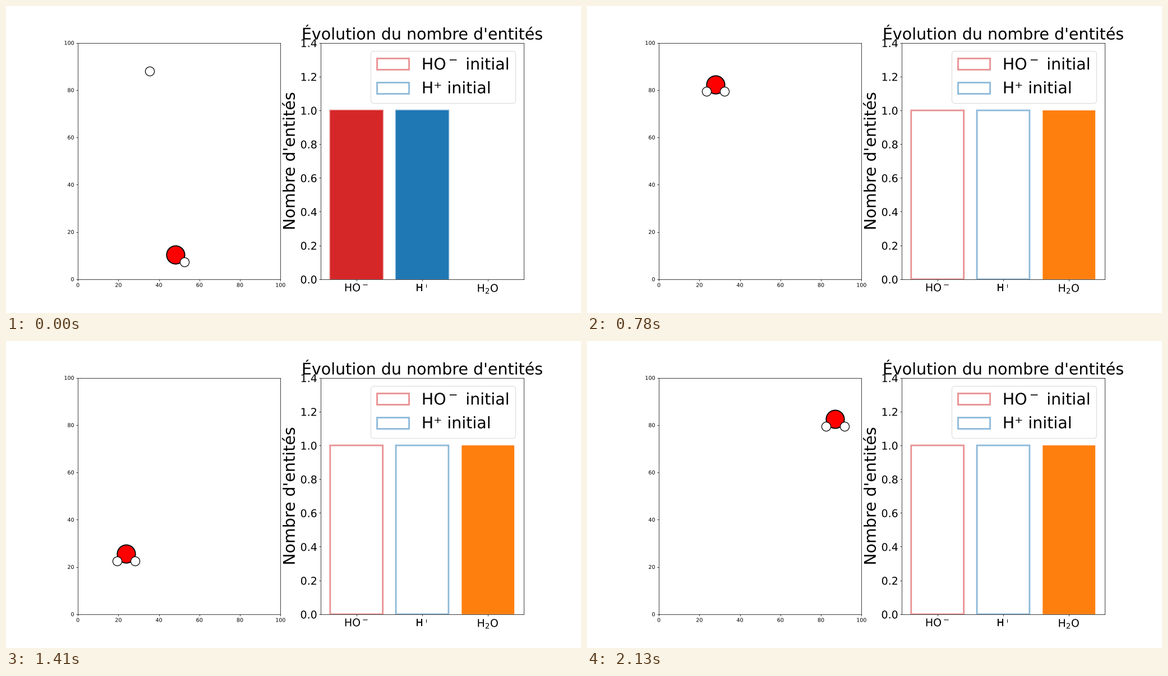
Write a matplotlib script that moves like this. It is 1025 by 547 pixels and loops after 2160 ms.

```python
import matplotlib.pyplot as plt
import numpy as np
from matplotlib.animation import FuncAnimation
from matplotlib.patheffects import Normal
from matplotlib.text import Text

plt.rcParams["font.family"] = "DejaVu Sans"

DPI = 547 / 8
FRAMES, CYCLE, REACTION = 72, 36, 11
RED, BLUE, ORANGE = "#d62728", "#1f77b4", "#ff7f0e"

# Walls the particles bounce between, in axis units (x, y)
LOW = np.array([6.35, 6.25])
HIGH = np.array([93.65, 93.70])
BOND_RIGHT = np.array([4.5, -3.0])
BOND_LEFT = np.array([-4.5, -3.0])

# (position, velocity per step)
HYDROXIDE = np.array([[48.15, 10.4], [10.48, 17.28]])
PROTON = np.array([[35.55, 88.1], [27.9, -8.93]])
WATER = np.array([[23.8, 25.6], [-11.365, 16.95]])


def bounce(particle, steps):
    """Uniform motion reflected elastically at the walls."""
    start, velocity = particle
    span = HIGH - LOW
    travel = start + velocity * steps - LOW
    return LOW + span - np.abs(travel % (2 * span) - span)


fig, (box, chart) = plt.subplots(
    1, 2, figsize=((1025 + 1e-6) / DPI, 8), dpi=DPI, facecolor="white"
)

box.set(xlim=(0, 100), ylim=(0, 100))


def atom(color, size, edge, z):
    (dot,) = box.plot([], [], "o", ms=size, mfc=color, mec="black", mew=edge,
                      zorder=z, snap=False)
    return dot


oxygen = atom("red", 34, 2, 3)
bound_h = atom("white", 17, 1.3, 4)
free_h = atom("white", 17, 1.3, 4)

minus = r"$^{\hspace{0.2}{-}\hspace{0.2}}$"
names = ["HO" + minus, "H⁺", "H$_2$O"]
bars = chart.bar(range(3), [1, 1, 0], color=[RED, BLUE, ORANGE], snap=False)
for i, color in enumerate((RED, BLUE)):
    chart.bar(i, 1, facecolor="none", edgecolor=color, linewidth=3, alpha=0.5,
              snap=False, label=names[i] + " initial")
chart.set_xlim(-0.54, 2.54)
chart.set_ylim(0, 1.4)
chart.set_xticks(range(3), names)
chart.tick_params(labelsize=20)
chart.set_ylabel("Nombre d'entités", fontsize=30)
chart.set_title("Évolution du nombre d'entités", fontsize=30)
chart.legend(fontsize=30, loc="upper right")

# Text drawn as outlines keeps its sub-pixel position
fig.draw_without_rendering()
for text in fig.findobj(Text):
    text.set_path_effects([Normal()])


def update(frame):
    step = frame % CYCLE
    reacted = step >= REACTION
    if reacted:
        center = bounce(WATER, step - REACTION)
        other = center + BOND_LEFT
    else:
        center = bounce(HYDROXIDE, step)
        other = bounce(PROTON, step)
    for dot, (x, y) in ((oxygen, center), (bound_h, center + BOND_RIGHT), (free_h, other)):
        dot.set_data([x], [y])
    for bar, count in zip(bars, (0, 0, 1) if reacted else (1, 1, 0)):
        bar.set_height(count)
    return oxygen, bound_h, free_h, *bars


anim = FuncAnimation(fig, update, frames=FRAMES, interval=30, repeat=True, repeat_delay=0)
plt.show()
```
